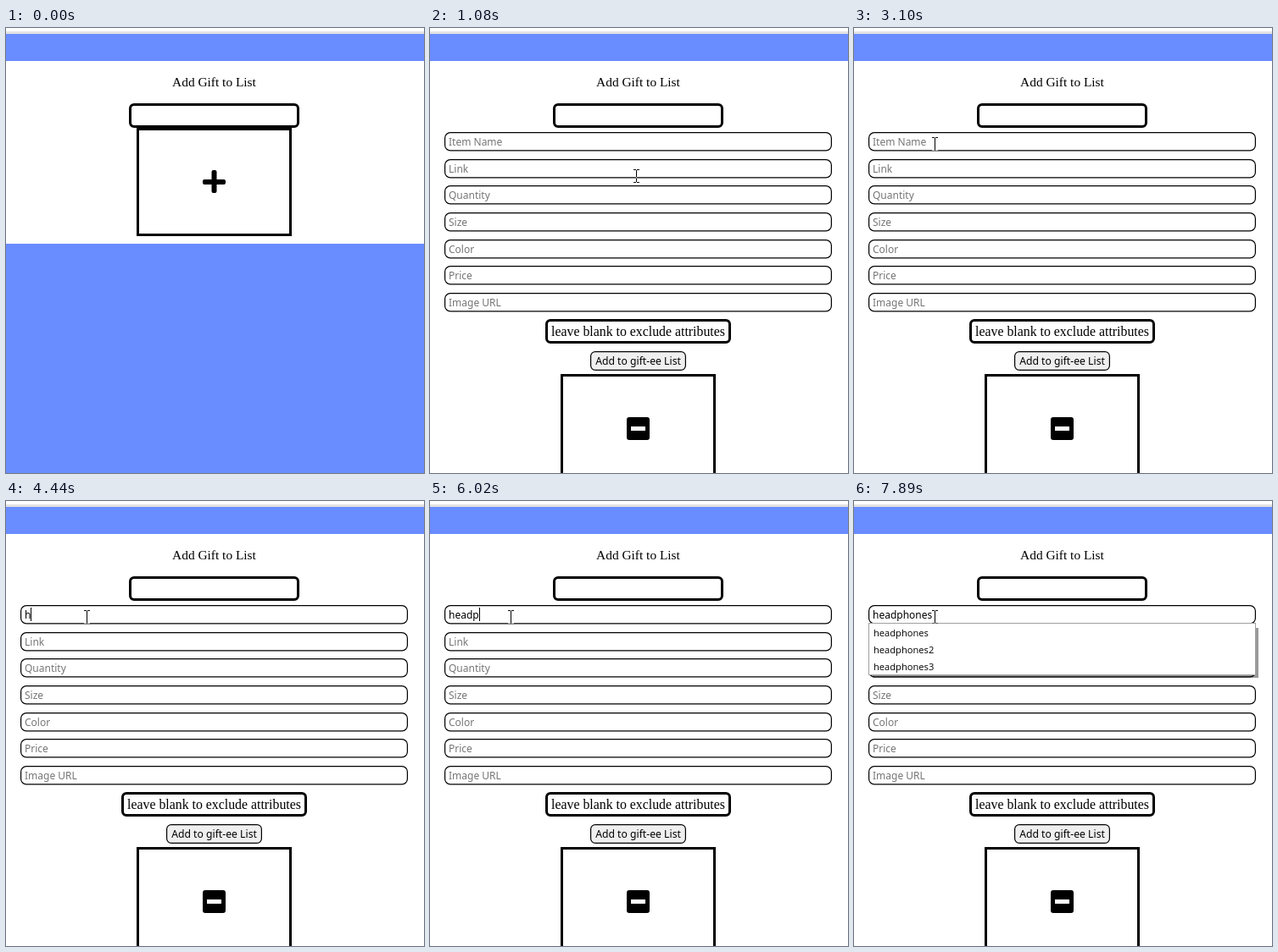
An HTML page with a canvas for the animation above (8 s loop, 493 by 526 pixels).

```html
<!DOCTYPE html>
<html lang="en">
<head>
<meta charset="utf-8">
<title>Add Gift to List</title>
<style>
html, body { margin: 0; width: 100%; height: 100%; overflow: hidden; background: #fff; }
canvas { display: block; width: 493px; height: 526px; }
</style>
</head>
<body>
<canvas id="stage" width="493" height="526"></canvas>
<script>
const ctx = document.getElementById('stage').getContext('2d');
const W = 493, H = 526, LOOP = 8000;
const BLUE = '#698cff', LINE = '#000';
const SANS = '12px "Noto Sans", "Open Sans", sans-serif';
const BUTTON = '12.2px "Noto Sans", "Open Sans", sans-serif';
const MENU = '11.15px "Open Sans", "Noto Sans", sans-serif';
const TITLE = '15.4px "Liberation Serif", serif';
const NOTE = '15.84px "Liberation Serif", serif';

const FIELDS = ['Item Name', 'Link', 'Quantity', 'Size', 'Color', 'Price', 'Image URL'];
const OPTIONS = ['headphones', 'headphones2', 'headphones3', 'hat'];

const OPEN_AT = 1080;
const CLICKS = [[1000, 1080], [2560, 2710]];

// time, typed text, caret shown, rows in the suggestion list
const TYPING = [
  [0, '', 0, 0], [2560, '', 1, 0], [3100, '', 0, 0], [3650, '', 1, 0], [4200, '', 0, 0],
  [4440, 'h', 1, 0], [4520, 'h', 1, 4], [4600, 'he', 1, 4], [4680, 'he', 1, 3],
  [4760, 'hea', 0, 3], [4840, 'head', 1, 3], [5000, 'headp', 1, 3],
  [5150, 'headpo', 1, 3], [5230, 'headpo', 1, 0], [5310, 'headpon', 1, 0],
  [5470, 'headpone', 1, 0], [5710, 'headpon', 1, 0], [5870, 'headpo', 1, 0],
  [6020, 'headp', 1, 0], [6100, 'headp', 1, 3], [6340, 'headp', 0, 3],
  [6650, 'head', 1, 3], [6880, 'head', 0, 3], [7190, 'headp', 1, 3],
  [7350, 'headph', 1, 3], [7430, 'headpho', 1, 3], [7580, 'headphon', 1, 3],
  [7660, 'headphone', 1, 3], [7890, 'headphones', 0, 3]
];

// pointer positions on the way to the plus sign, one per 80 ms
const APPROACH = [[350, 419], [332, 374], [298, 296], [264, 220], [243, 173], [235, 160], [241, 174]];

const ARROW = new Path2D('M.5 .5V16.5L4.2 13L6.7 18.5L9 17.5L6.6 12.2H11.8Z');
const HAND = new Path2D('M-1.5 1.5Q-1.5 .5 0 .5Q1.5 .5 1.5 2V8Q1.8 7 3 7Q4.5 7 4.5 8.5' +
  'Q5 7.6 6 7.8Q7.5 8 7.5 9.5Q8 8.6 9 8.8Q10.5 9 10.5 11V16Q10.5 19.5 8.5 21.5V23.5H-1V21.5' +
  'L-5.5 15Q-6.6 12.8 -5.2 12Q-3.8 11.6 -1.5 14.5Z');
const FINGERS = new Path2D('M1.5 8V12M4.5 8.5V12M7.5 9.5V12');

function rect(x, y, w, h, color) {
  ctx.fillStyle = color;
  ctx.fillRect(x, y, w, h);
}

// outer edges x, y, w, h with the line drawn inside them
function box(x, y, w, h, line, radius, fill) {
  const half = line / 2;
  ctx.beginPath();
  ctx.roundRect(x + half, y + half, w - line, h - line, Math.max(0, radius - half));
  if (fill) {
    ctx.fillStyle = fill;
    ctx.fill();
  }
  ctx.lineWidth = line;
  ctx.strokeStyle = LINE;
  ctx.stroke();
}

function text(str, x, y, font, color = '#000', align = 'left') {
  ctx.font = font;
  ctx.fillStyle = color;
  ctx.textAlign = align;
  ctx.fillText(str, x, y);
}

function drawHeader() {
  rect(0, 0, W, H, '#fff');
  rect(0, 4, W, 3, '#e2e2e2');
  rect(0, 7, W, 32, BLUE);
  text('Add Gift to List', 245.5, 69, TITLE, '#000', 'center');
  box(145, 89, 201, 29, 3, 6);
}

function drawClosed() {
  rect(0, 255, W, H - 255, BLUE);
  box(154, 118, 183, 128, 3, 0);
  ctx.fillStyle = '#000';
  ctx.beginPath();
  ctx.roundRect(232, 179, 27, 6, 2);
  ctx.roundRect(242.5, 168, 6, 27, 2);
  ctx.fill();
}

function drawForm(typed, caret) {
  FIELDS.forEach((label, i) => {
    const y = Math.round(123 + i * 31.65);
    box(17, y, 457, 22.5, 1.2, 7, '#fff');
    const own = i === 0 && typed;
    text(own ? typed : label, 22, y + 16, SANS, own ? '#000' : '#757575');
  });
  if (caret) {
    ctx.font = SANS;
    rect(22 + Math.round(ctx.measureText(typed).width), 126, 1, 16, '#000');
  }
  box(136, 344, 219, 29, 3, 6);
  text('leave blank to exclude attributes', 245.5, 364, NOTE, '#000', 'center');
  box(189, 382, 113, 23, 1.2, 6, '#efefef');
  text('Add to gift-ee List', 245.5, 398, BUTTON, '#000', 'center');
  box(154, 409, 183, 140, 3, 0);
  ctx.fillStyle = '#000';
  ctx.beginPath();
  ctx.roundRect(232, 460, 27, 27, 3);
  ctx.fill();
  rect(237, 471, 17, 5, '#fff');
}

function drawMenu(rows) {
  const h = 2 + rows * 20;
  rect(22, 144 + h, 455, 3, 'rgba(0,0,0,.4)');
  rect(474, 150, 3, h - 6, 'rgba(0,0,0,.4)');
  rect(17, 144, 457, h, '#a0a0a0');
  rect(18, 145, 455, h - 2, '#fff');
  for (let i = 0; i < rows; i++) text(OPTIONS[i], 23, 160 + i * 20, MENU);
}

function pointer(t) {
  if (t < OPEN_AT) {
    const step = Math.min(APPROACH.length - 1, Math.floor((t - 370) / 80));
    return APPROACH[step];
  }
  const k = Math.max(0, Math.min(6, Math.floor((t - 1540) / 80) + 1)) / 6;
  const e = k * k * (3 - 2 * k);
  return [Math.round(239 - 148 * e), Math.round(175 - 38 * e)];
}

function drawBeam(x, y) {
  // inverts whatever lies below
  ctx.globalCompositeOperation = 'difference';
  for (const row of [y - 8, y + 7]) {
    rect(x - 3, row, 3, 1, '#fff');
    rect(x + 1, row, 3, 1, '#fff');
  }
  rect(x, y - 7, 1, 14, '#fff');
  ctx.globalCompositeOperation = 'source-over';
}

function drawPointer(t) {
  if (t < 370) return;
  const [x, y] = pointer(t);
  if (CLICKS.some(([from, to]) => t >= from && t < to)) {
    ctx.fillStyle = 'rgba(255,255,0,.5)';
    ctx.beginPath();
    ctx.arc(x, y, 12, 0, Math.PI * 2);
    ctx.fill();
  }
  if (t >= OPEN_AT) return drawBeam(x + 4, y);
  const overBox = x > 154 && x < 337 && y > 118 && y < 246;
  ctx.save();
  ctx.translate(overBox ? x + 1 : x, y);
  ctx.lineWidth = 1;
  ctx.strokeStyle = '#000';
  ctx.fillStyle = '#fff';
  ctx.fill(overBox ? HAND : ARROW);
  ctx.stroke(overBox ? HAND : ARROW);
  if (overBox) ctx.stroke(FINGERS);
  ctx.restore();
}

function draw(t) {
  drawHeader();
  if (t < OPEN_AT) {
    drawClosed();
  } else {
    const [, typed, caret, rows] = TYPING.findLast(s => s[0] <= t);
    drawForm(typed, caret);
    if (rows) drawMenu(rows);
  }
  drawPointer(t);
}

const start = performance.now();
function tick() {
  draw((performance.now() - start) % LOOP);
  requestAnimationFrame(tick);
}
tick();
</script>
</body>
</html>
```
